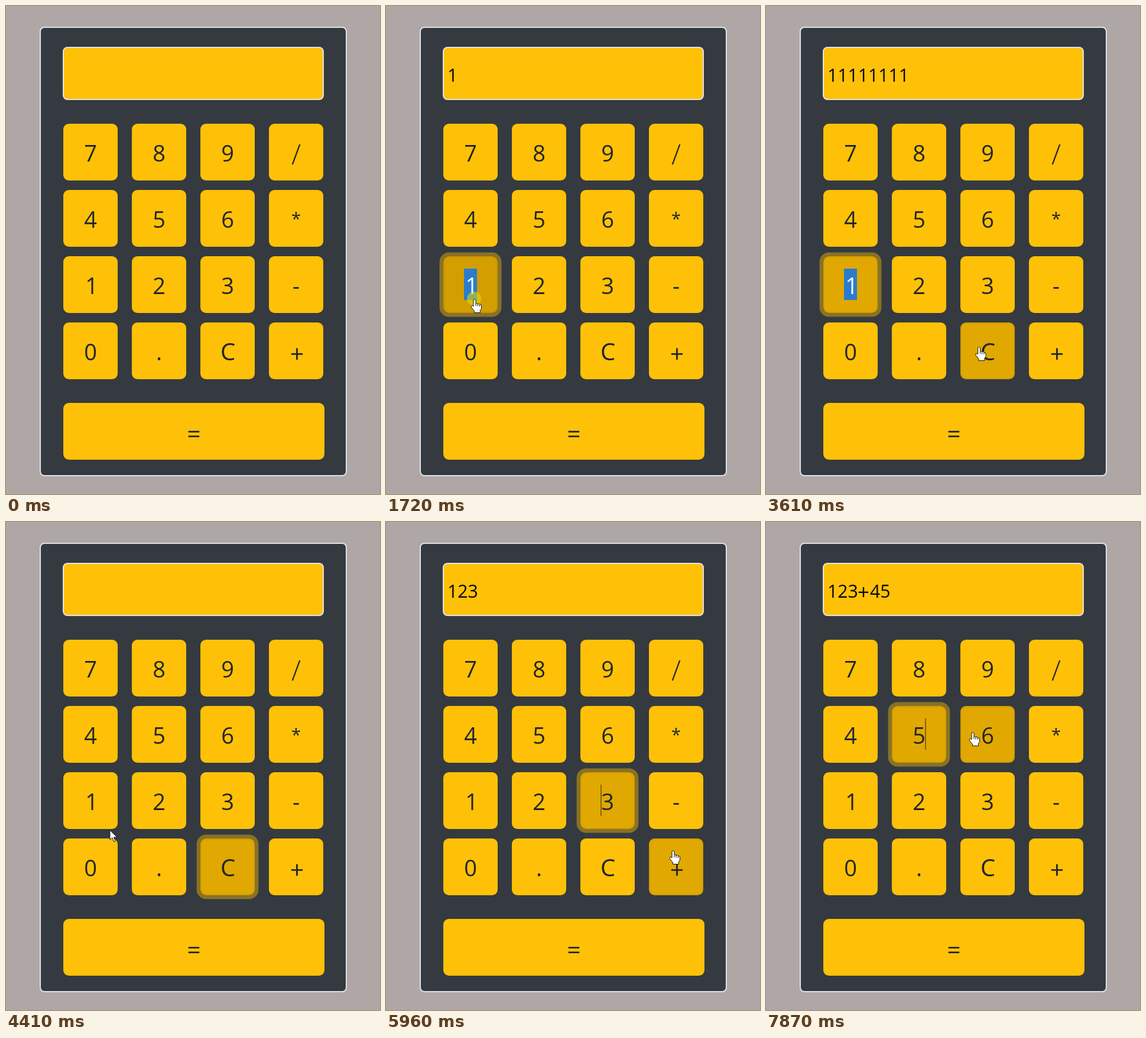
An HTML page for the animation above (8000 ms loop, 633 by 825 pixels).

```html
<!DOCTYPE html>
<html lang="en">
<head>
<meta charset="utf-8">
<title>Calculator</title>
<style>
  html, body { margin: 0; width: 100%; height: 100%; overflow: hidden; background: #aea7a5; }
  svg { display: block; width: 100%; height: 100%; }
  text { font: 38px "Open Sans", "Noto Sans", sans-serif; fill: #212529; }
  .panel { fill: #343a40; stroke: #dee2e6; stroke-width: 2; }
  .screen { fill: #ffc107; stroke: #dee2e6; stroke-width: 2; }
  .key text { text-anchor: middle; }
  .key .face { fill: #ffc107; stroke: #ffc107; stroke-width: 2; }
  .key .ring { fill: none; stroke: rgba(222, 170, 12, .5); stroke-width: 6.4; visibility: hidden; }
  .key .mark { fill: #2a7ccf; visibility: hidden; }
  .key.lit .face { fill: #e0a800; stroke: #d39e00; }
  .key.down .face { fill: #d39e00; stroke: #c69500; }
  .key.focus .ring, .key.selected .mark { visibility: visible; }
  .key.selected text { fill: #fff; }
  #display text { font-size: 30.2px; fill: #080808; }
  #display #plus { font-size: 35px; text-anchor: middle; }
  #caret { fill: #212529; }
  #spot { fill: rgba(230, 222, 0, .55); }
  #cursor path { fill: #fff; stroke: #111; stroke-linejoin: round; }
</style>
</head>
<body>
<svg viewBox="0 0 633 825">
  <rect class="panel" x="58" y="36" width="518" height="758" rx="7"/>
  <rect class="screen" x="97" y="70" width="440" height="88" rx="7"/>
  <g id="display">
    <text id="left" x="104" y="128"></text>
    <text id="plus" x="165" y="131"></text>
    <text id="right" x="176" y="128"></text>
  </g>
  <g id="keys"></g>
  <rect id="caret" width="1" height="53"/>
  <g id="cursor">
    <circle id="spot" r="12"/>
    <path id="hand" transform="translate(1)" d="M-2 1.8Q0-1 2 1.8V8Q4 6.8 5 8.6Q7.4 7.6 8.3 9.6Q11.4 9 11.5 12V16.5L9.3 20V23.5H-.5V21L-5.4 14.5Q-6.6 11.5-4.4 11.2Q-3 11.3-2 13ZM2 8V12M5 9V12.5M8.3 10V13"/>
    <path id="arrow" d="M0 0V16.5L4 12.8L6.6 19.5L9.2 18.4L6.6 12H12Z"/>
  </g>
</svg>
<script>
const LOOP = 8000, HOLD = 75, TRAVEL = 520, BLINK = 530;
const $ = id => document.getElementById(id);

// Symbols whose size or place differs from the digits
const styles = {
  "/": { size: 47, dy: 5, weight: 300 }, "*": { size: 29, dy: -5 },
  "+": { size: 41, dx: 1.5, dy: 2.5 }, "=": { size: 41, dy: 3 },
  "C": { size: 40, dx: .5 }, "1": { dx: 2 }
};

const keys = {};
function addKey(name, x, y, w = 92, h = 96) {
  const { size = 38, dx = 0, dy = 0, weight = 400 } = styles[name] || {};
  const cx = x + w / 2, cy = y + h / 2;
  $("keys").insertAdjacentHTML("beforeend", `<g class="key">
    <rect class="ring" x="${x - 3.2}" y="${y - 3.2}" width="${w + 6.4}" height="${h + 6.4}" rx="12.8"/>
    <rect class="face" x="${x + 1}" y="${y + 1}" width="${w - 2}" height="${h - 2}" rx="8.6"/>
    <rect class="mark" x="${cx - 11}" y="${cy - 27}" width="22" height="53"/>
    <text x="${cx + dx}" y="${cy + 16 + dy}" font-weight="${weight}"
      style="font-size:${size}px;font-weight:${weight}">${name}</text></g>`);
  keys[name] = { cx, cy, w, h, node: $("keys").lastElementChild };
}
["789/", "456*", "123-", "0.C+"].forEach((row, r) =>
  [...row].forEach((name, c) => addKey(name, 97 + 116 * c, 199 + 112 * r)));
addKey("=", 97, 671, 442);

// Each visit: key, press time, pointer offset from the key's centre, pause before pressing
const visits = [];
function visit(name, press, dx, dy, rest = 160) {
  const { cx, cy } = keys[name];
  visits.push({ name, presses: [press], x: cx + dx, y: cy + dy, arrive: press - rest, side: Math.sign(dx) });
}
visit("1", 1590, 6, 24);
visit("C", 3860, 1, -10);
visit("1", 4646, 22, 41);
visit("2", 5030, 6, 7);
visit("3", 5410, -23, 7);
visit("+", 6220, -6, -28, 265);
visit("4", 7160, 1, 35);
visit("5", 7710, 11, -2);
visit("6", 8025, -26, -4);

// The first key gets a double click, then a steady burst
visits[0].presses.push(1710);
for (let i = 0; i < 6; i++) visits[0].presses.push(2050 + 155 * i);

const clicks = visits.flatMap(v => v.presses.map(time => ({ time, name: v.name, side: v.side })));
const selectFrom = clicks[1].time, selectTo = visits[1].presses[0];
const entry = { x: 575, y: 683, leave: 610 };

const ease = k => (1 - Math.cos(Math.PI * k)) / 2;

// Moves swing below the straight line; the entrance swings high above it
function pointerAt(t) {
  if (t < entry.leave) return null;
  const i = Math.max(0, visits.findLastIndex(v => v.presses.at(-1) + HOLD <= t) + 1);
  const to = visits[i], from = visits[i - 1] || entry;
  const start = i ? Math.max(from.presses.at(-1) + HOLD, to.arrive - TRAVEL) : entry.leave;
  const k = ease(Math.min(1, Math.max(0, (t - start) / (to.arrive - start))));
  const dx = to.x - from.x, dy = to.y - from.y;
  const bow = Math.hypot(dx, dy) * (i ? .135 : -.75);
  return { x: from.x + dx * k, y: from.y + dy * k + bow * 4 * k * (1 - k) };
}

const inside = (p, k) => Math.abs(p.x - k.cx) < k.w / 2 && Math.abs(p.y - k.cy) < k.h / 2;
const show = (node, on) => node.setAttribute("visibility", on ? "inherit" : "hidden");

function drawDisplay(t) {
  const typed = clicks.filter(c => c.time + HOLD <= t)
    .reduce((text, c) => c.name === "C" ? "" : text + c.name, "");
  const [left, right] = typed.split("+");
  $("left").textContent = left;
  $("plus").textContent = right === undefined ? "" : "+";
  $("right").textContent = right || "";
}

function drawCaret(t, focus, selecting) {
  const on = focus && !selecting && (t + BLINK * 2 - 180) % (BLINK * 2) < BLINK;
  show($("caret"), on);
  if (!on) return;
  const { cx, cy } = keys[focus.name];
  $("caret").setAttribute("x", cx - .5 + 11 * focus.side);
  $("caret").setAttribute("y", cy - 27);
}

function render(t) {
  const pointer = pointerAt(t);
  const focus = clicks.findLast(c => c.time <= t);
  const pressed = focus && t < focus.time + HOLD;
  const selecting = t >= selectFrom && t < selectTo;
  let hovering = false;

  for (const [name, key] of Object.entries(keys)) {
    const hover = pointer && inside(pointer, key);
    const focused = focus && focus.name === name;
    hovering = hovering || hover;
    const flags = { lit: hover || focused, focus: focused, down: focused && pressed,
                    selected: selecting && name === "1" };
    for (const flag in flags) key.node.classList.toggle(flag, !!flags[flag]);
  }

  drawDisplay(t);
  drawCaret(t, focus, selecting);
  show($("cursor"), pointer);
  if (pointer) $("cursor").setAttribute("transform", `translate(${pointer.x} ${pointer.y})`);
  show($("spot"), pressed);
  show($("hand"), hovering);
  show($("arrow"), !hovering);
}

let start;
function tick(now) {
  start ??= now;
  render((now - start) % LOOP);
  requestAnimationFrame(tick);
}
render(0);
requestAnimationFrame(tick);
</script>
</body>
</html>
```
